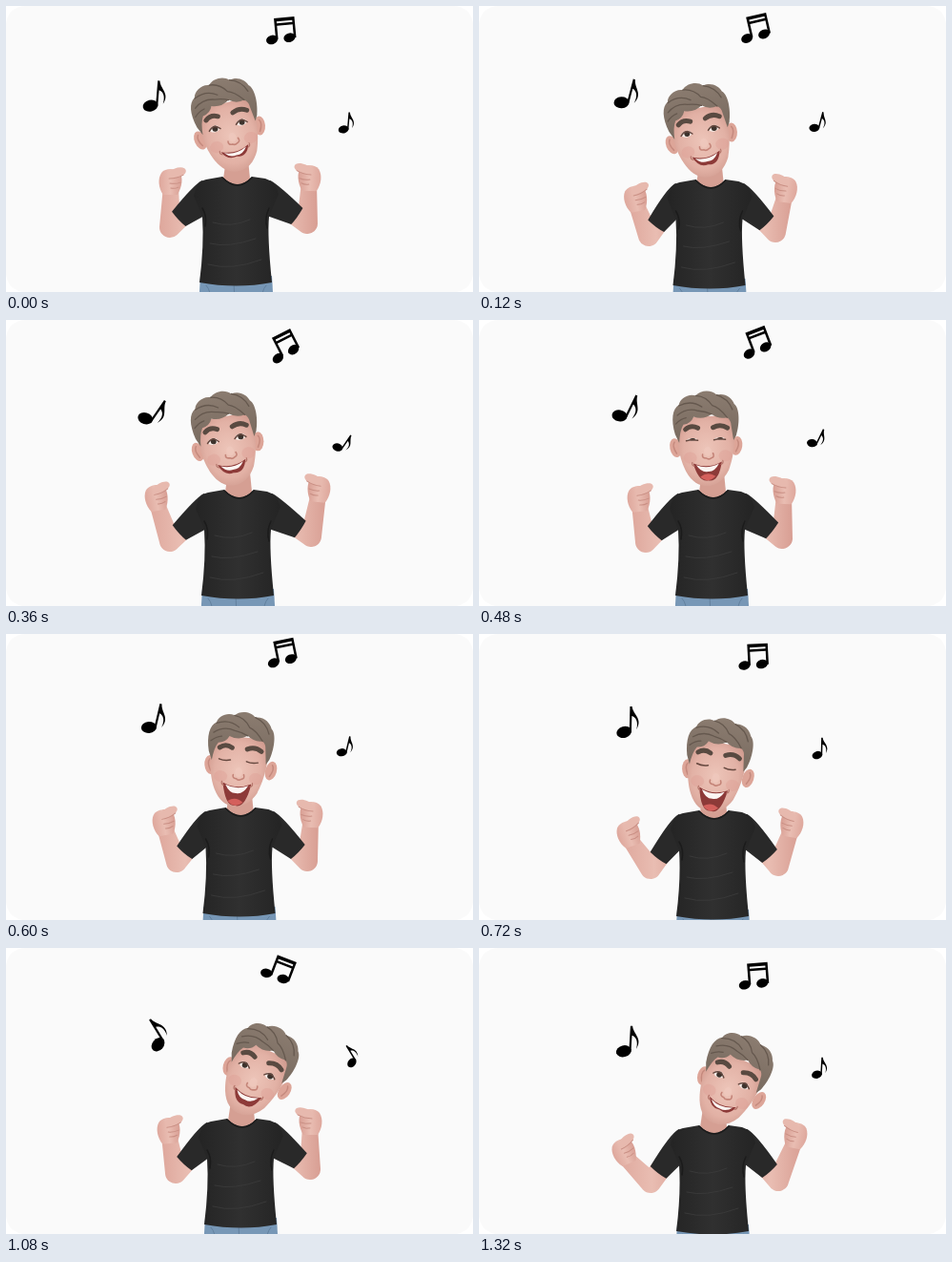
An HTML page for the animation above (1.44 s loop, 490 by 300 pixels).

```html
<!DOCTYPE html>
<html lang="en">
<head>
<meta charset="utf-8">
<title>Dancing figure</title>
<style>
html, body { margin: 0; width: 100%; height: 100%; overflow: hidden; background: #fff; }
svg { display: block; width: 490px; height: 300px; }
.line { fill: none; stroke-linecap: round; stroke-linejoin: round; }
</style>
</head>
<body>
<svg viewBox="0 0 490 300">
  <defs>
    <radialGradient id="skin" cx=".5" cy=".48" r=".62">
      <stop offset="0" stop-color="#edc5b9"/><stop offset=".65" stop-color="#e2b1a5"/><stop offset="1" stop-color="#cd978b"/>
    </radialGradient>
    <linearGradient id="arm" x1="0" x2="1">
      <stop offset="0" stop-color="#dea79c"/><stop offset=".5" stop-color="#e9bdb2"/><stop offset="1" stop-color="#d89e93"/>
    </linearGradient>
    <linearGradient id="cloth" x1="0" x2="1">
      <stop offset="0" stop-color="#242424"/><stop offset=".5" stop-color="#303030"/><stop offset="1" stop-color="#242424"/>
    </linearGradient>
    <linearGradient id="hair" x1="0" x2="0" y1="0" y2="1">
      <stop offset="0" stop-color="#8b7c70"/><stop offset="1" stop-color="#786a5f"/>
    </linearGradient>
    <g id="single">
      <g transform="translate(-2 -2.5)">
        <ellipse cx="-1.5" cy="13" rx="8" ry="6" transform="rotate(-18 -1.5 13)"/>
        <path d="M4 13V-14H6.2C7.5-5 18-2 11.5 10C13.5 1 10-3 6.2-4V13Z"/>
      </g>
    </g>
    <g id="double">
      <ellipse cx="-10" cy="9" rx="6.2" ry="4.7" transform="rotate(-12 -10 9)"/>
      <ellipse cx="8.5" cy="8.5" rx="6.2" ry="4.7" transform="rotate(-12 8.5 8.5)"/>
      <path d="M-6-13H15.5V9H13V-5H-3.5V9H-6ZM-3.5-9.5V-7.5H13V-9.5Z" fill-rule="evenodd"/>
    </g>
    <g id="fist">
      <path fill="url(#arm)" d="M-8 15C-13 8-14-2-10-8C-6-13 4-13 9-9C13-4 12 7 7 15Z"/>
      <path fill="#e7b9ae" d="M-3-8C2-13 10-15 14-13C17-11 16-7 11-5C7-3 2-2-2-3Z"/>
      <path class="line" stroke="#c98f84" d="M-2-2Q6-2 13-6M-1 3Q5 4 10 2M0 8Q4 9 8 7"/>
    </g>
  </defs>
  <rect width="490" height="300" rx="20" fill="#fafafa"/>
  <use id="note1" href="#single"/>
  <use id="note2" href="#double"/>
  <use id="note3" href="#single"/>

  <path id="armL" fill="url(#arm)"/>
  <path id="armR" fill="url(#arm)"/>
  <use id="handL" href="#fist"/>
  <use id="handR" href="#fist"/>

  <g id="body">
    <path fill="#7797b6" d="M206 282H281L283 315H204Z"/>
    <path class="line" stroke="#62809e" d="M241 288L242 312M212 292Q218 298 216 312M275 292Q269 298 271 312"/>
    <path fill="#d59f93" d="M233 160H256L258 180Q245 196 230 180Z"/>
  </g>
  <path id="sleeveL" fill="#292929"/>
  <path id="sleeveR" fill="#292929"/>
  <g id="shirt">
    <path fill="url(#cloth)" d="M229 178Q245 194 260 178L274 180Q285 183 288 196L278 220Q276 240 281 289Q244 296 205 289Q210 250 208 220L199 198Q202 183 212 181Z"/>
    <path class="line" stroke="#1b1b1b" stroke-width="1.5" d="M229 179Q245 195 260 179M208 211Q213 219 211 230M278 211Q273 221 276 232"/>
    <path class="line" stroke="#393939" d="M219 226Q238 232 258 223M216 248Q235 253 264 243M214 270Q238 277 270 265"/>
  </g>

  <g id="head">
    <g id="ears">
      <ellipse cx="-32" cy="8" rx="6" ry="10" fill="#dda598" transform="rotate(-10 -32 8)"/>
      <ellipse cx="32" cy="8" rx="6" ry="10" fill="#dda598" transform="rotate(10 32 8)"/>
      <path class="line" stroke="#c58a7e" stroke-width="1.5" d="M-31 14Q-36 6-33 2M31 14Q36 6 33 2"/>
    </g>
    <path fill="url(#skin)" d="M-29-24C-31 5-28 20-22 33C-16 45-8 49 0 49C9 49 17 44 23 33C28 20 32 4 30-24Z"/>
    <ellipse cx="-17" cy="19" rx="7" ry="6" fill="#dd9c92" opacity=".35"/>
    <ellipse cx="20" cy="18" rx="7" ry="6" fill="#dd9c92" opacity=".35"/>
    <path fill="url(#hair)" d="M-28 3L-32-6C-36-22-34-33-27-37C-26-43-17-49-9-46C-4-52 8-52 13-46C22-48 29-42 31-36C37-31 36-14 32-3L29 2L27-14Q27-19 23-22Q14-20 7-26Q-2-20-12-24Q-15-17-23-16Q-27-10-28 3Z"/>
    <path class="line" stroke="#65584e" stroke-width="1.3" d="M-27-36Q-14-42-3-34M-9-46Q2-45 8-35Q15-33 23-22M-29-26Q-19-34-7-30Q1-29 7-26M13-46Q25-42 29-30M-31-17Q-26-22-20-23"/>
    <path class="line" stroke="#594a41" stroke-width="5" d="M-21-11Q-15-16-8-12M8-12Q16-16 23-11"/>
    <g id="eyes"></g>
    <path class="line" stroke="#c48478" stroke-width="1.6" d="M-4 16Q-5 20 0 20Q2 22 5 20Q9 19 7 15"/>
    <ellipse cx="1.5" cy="13" rx="4" ry="5" fill="#f0c9bd" opacity=".7"/>
    <path id="mouth" fill="#8d3a38"/>
    <path id="tongue" fill="#d4605c"/>
    <path id="teeth" fill="#fbf5f2"/>
    <path class="line" stroke="#b6766b" stroke-width="1.2" d="M-15 24Q-16 27-13 28M17 23Q18 26 15 27"/>
  </g>
</svg>
<script>
const STEP = 120, STEPS = 12;
const el = id => document.getElementById(id);
const put = (id, name, value) => el(id).setAttribute(name, value);

// Each track lists its values at these steps; steps between are blended.
const keys = [0, 2, 3, 4, 5, 6, 8, 9, 11];
const tracks = {
  body: [[-2, 1], [-1, 7], [0, 0], [1, 0], [1.5, 4], [2, 7], [3, 6], [3, 1], [2, 8]],
  head: [[233, 125.5, -14], [231, 137, -10], [231.5, 125, -10], [238, 125, -2], [244, 132, 6],
         [249, 138, 9], [255, 131.5, 13], [263.5, 128.5, 24], [265, 138.5, 24]],
  left: [[173, 183, 172, 232], [156, 218, 184, 250], [158, 185, 172, 232], [168, 186, 175, 233], [166, 196, 179, 239],
         [157, 208, 180, 246], [153, 199, 174, 239], [171, 190, 178, 236], [152, 212, 180, 246]],
  right: [[318, 179, 316, 228], [325, 203, 306, 246], [328, 176, 320, 227], [320, 178, 318, 229], [320, 188, 316, 238],
          [328, 198, 314, 243], [333, 185, 320, 234], [319, 181, 319, 232], [332, 195, 314, 244]],
  face: [[.1, 1], [.4, 1], [.25, 1], [.7, .4], [1, 0], [1, 0], [.8, 1], [.4, 1], [.1, 1]],  // mouth, eyes
  note: [[.1, 0], [.72, -5], [1, 2], [.75, -2], [.36, -6], [0, -2], [-.85, 2], [-1, -4], [.06, 3.5]]  // swing, lift
};

const mix = (a, b, t) => a + (b - a) * t;

function pose(name, step) {
  let i = keys.length - 1;
  while (keys[i] > step) i--;
  const a = tracks[name][i], b = tracks[name][i + 1] || a;
  const t = (step - keys[i]) / ((keys[i + 1] || STEPS) - keys[i]);
  return a.map((v, n) => mix(v, b[n], t));
}

function place(id, x, y, turn = 0, sx = 1, sy = sx) {
  put(id, 'transform', `translate(${x} ${y}) rotate(${turn}) scale(${sx} ${sy})`);
}

// Points on both sides of a, square to the line a-b.
function sides(a, b, r) {
  const dx = b[0] - a[0], dy = b[1] - a[1], n = Math.hypot(dx, dy);
  const ox = -dy / n * r, oy = dx / n * r;
  return [[a[0] + ox, a[1] + oy], [a[0] - ox, a[1] - oy]];
}

function limb(a, b, ra, rb) {
  const [p, q] = sides(a, b, ra), [s, r] = sides(b, a, rb);
  return `M${p}L${r}A${rb} ${rb} 0 0 0 ${s}L${q}A${ra} ${ra} 0 0 0 ${p}Z`;
}

function drawArm(side, dir, [hx, hy, ex, ey], [bx, by]) {
  const hand = [hx, hy + 6], elbow = [ex, ey];
  const shoulder = [243.5 + dir * 36.5 + bx, 200 + by];
  put('arm' + side, 'd', limb(hand, elbow, 8, 11) + limb(elbow, shoulder, 11, 10));
  const lean = Math.atan2(hx - ex, ey - hy) * 180 / Math.PI;
  place('hand' + side, hx, hy, lean * .6, -dir, 1);

  const cuff = shoulder.map((v, i) => mix(v, elbow[i], .72));
  let [outer, inner] = sides(cuff, elbow, 10.5);
  if (dir > 0) [outer, inner] = [inner, outer];
  const top = [243.5 + dir * 36 + bx, 182 + by];
  const bend = [243.5 + dir * 45 + bx, 187 + by];
  const pit = [243.5 + dir * 35 + bx, 220 + by];
  put('sleeve' + side, 'd', `M${top}Q${bend} ${outer}Q${cuff[0]} ${cuff[1] + 2} ${inner}L${pit}L${243.5 + bx} ${200 + by}Z`);
}

function drawFace([open, eyes]) {
  const low = 35 + 16 * open;
  put('mouth', 'd', `M-14 25Q1 32 16 24Q12 ${low} 1 ${low - 3}Q-9 ${low - 1}-14 25Z`);
  put('teeth', 'd', `M-11 27Q1 32 13 26Q8 ${33 + 3 * open} 1 ${32 + 3 * open}Q-6 ${33 + 3 * open}-11 27Z`);
  put('tongue', 'd', open > .5 ? `M-7 ${low - 7}Q1 ${low - 13} 9 ${low - 7}Q1 ${low + 1}-7 ${low - 7}Z` : '');
  el('eyes').innerHTML = [-14.5, 14.5].map(x => `
    <ellipse cx="${x}" rx="5.5" ry="${3.3 * eyes}" fill="#f6eeea"/>
    <ellipse cx="${x + .5}" cy="-.2" rx="3" ry="${3.1 * eyes}" fill="#3d332d"/>
    <path class="line" stroke="#66483f" stroke-width="1.5" d="M${x - 6} 1Q${x} ${3 - 9 * eyes} ${x + 6} 1"/>`).join('');
}

function draw(step) {
  const body = pose('body', step), [hx, hy, tilt] = pose('head', step);
  const [swing, lift] = pose('note', step);
  place('body', ...body);
  place('shirt', ...body);
  drawArm('L', -1, pose('left', step), body);
  drawArm('R', 1, pose('right', step), body);
  place('head', hx, hy, tilt);
  place('ears', tilt > 0 ? 3 : 0, 0);
  drawFace(pose('face', step));

  const turn = 1.5 + 33 * swing;
  place('note1', 156 - swing, 94.5 + lift, turn);
  place('note2', 288 + 2.2 * swing, 25.5 + lift, -3 - 24 * swing);
  place('note3', 357.5 - 3.7 * swing, 122 + 5 * swing + lift, turn, .68);
}

const start = performance.now();
function tick() {
  draw(Math.floor((performance.now() - start) / STEP) % STEPS);
  requestAnimationFrame(tick);
}
tick();
</script>
</body>
</html>
```
